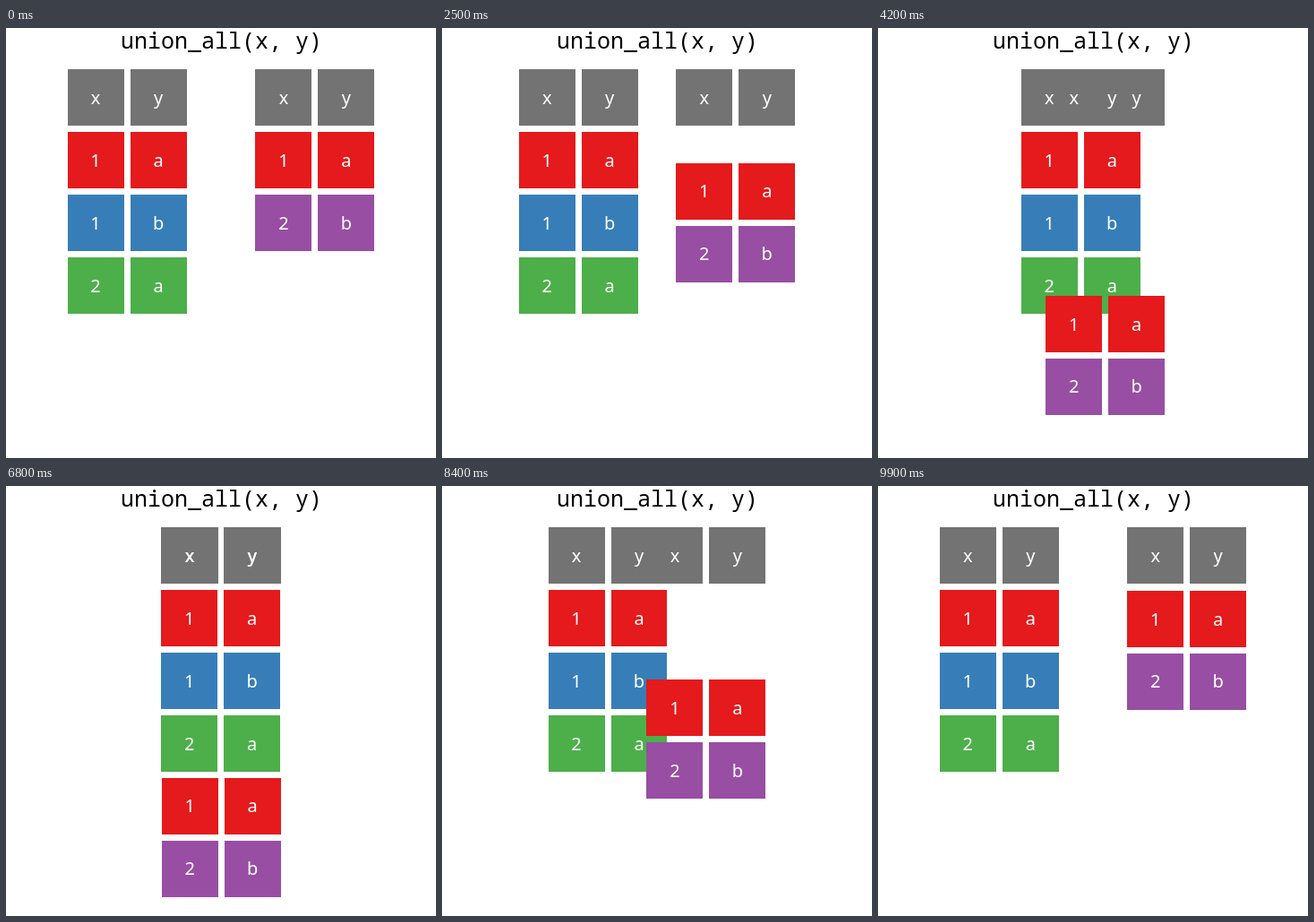
Animation of 480x480 px, one loop 10 s. Source, as an HTML page with a canvas:

```html
<!DOCTYPE html>
<html>
<head>
<meta charset="utf-8">
<style>
html, body { margin: 0; height: 100%; overflow: hidden; background: #fff; }
canvas { display: block; }
</style>
</head>
<body>
<canvas id="stage" width="480" height="480"></canvas>
<script>
const ctx = document.getElementById('stage').getContext('2d');
const LOOP = 10000, FRAME = 100;
const STEP = 69.95, SIZE = STEP * 0.9, LEFT = 68.6, TOP = 46.42;
const GREY = '#737373', RED = '#e41a1c', BLUE = '#377eb8',
      GREEN = '#4daf4a', PURPLE = '#984ea3';

// Each row: colour, two labels
const tableX = [[GREY, 'xy'], [RED, '1a'], [BLUE, '1b'], [GREEN, '2a']];
const tableY = [[GREY, 'xy'], [RED, '1a'], [PURPLE, '2b']];

const ease = k => (1 - Math.cos(Math.PI * Math.min(1, Math.max(0, k)))) / 2;

// 0 = tables apart, 1 = tables stacked
function progress(t) {
  return t < 6700 ? ease((t - 1600) / 3400) : 1 - ease((t - 6700) / 3300);
}

// Columns and rows are in cell units; drop shifts only the body rows
function place(table, col, drop) {
  return table.flatMap(([color, labels], row) => [...labels].map((label, i) => ({
    color, label,
    x: LEFT + (col + i) * STEP,
    y: TOP + (row + (row ? drop : 0)) * STEP
  })));
}

function drawTile({ color, x, y }) {
  const [l, t, r, b] = [x, y, x + SIZE, y + SIZE].map(Math.round);
  ctx.fillStyle = color;
  ctx.fillRect(l, t, r - l, b - t);
}

function drawLabel({ label, x, y }) {
  ctx.fillText(label, x + SIZE / 2, y + SIZE / 2 + 7.2);
}

function draw(now) {
  const p = progress(Math.floor(now % LOOP / FRAME) * FRAME);
  const cells = [...place(tableX, 1.5 * p, 0), ...place(tableY, 3 - 1.5 * p, 3 * p)];

  ctx.fillStyle = '#fff';
  ctx.fillRect(0, 0, 480, 480);
  ctx.textAlign = 'center';
  ctx.fillStyle = '#000';
  ctx.font = '25px "Noto Sans Mono", monospace';
  ctx.fillText('union_all(x, y)', 240.5, 23);

  cells.forEach(drawTile);
  ctx.fillStyle = '#fff';
  ctx.font = '20px "Noto Sans", sans-serif';
  cells.forEach(drawLabel);
}

const start = performance.now();
function tick() {
  draw(performance.now() - start);
  requestAnimationFrame(tick);
}
tick();
</script>
</body>
</html>
```
